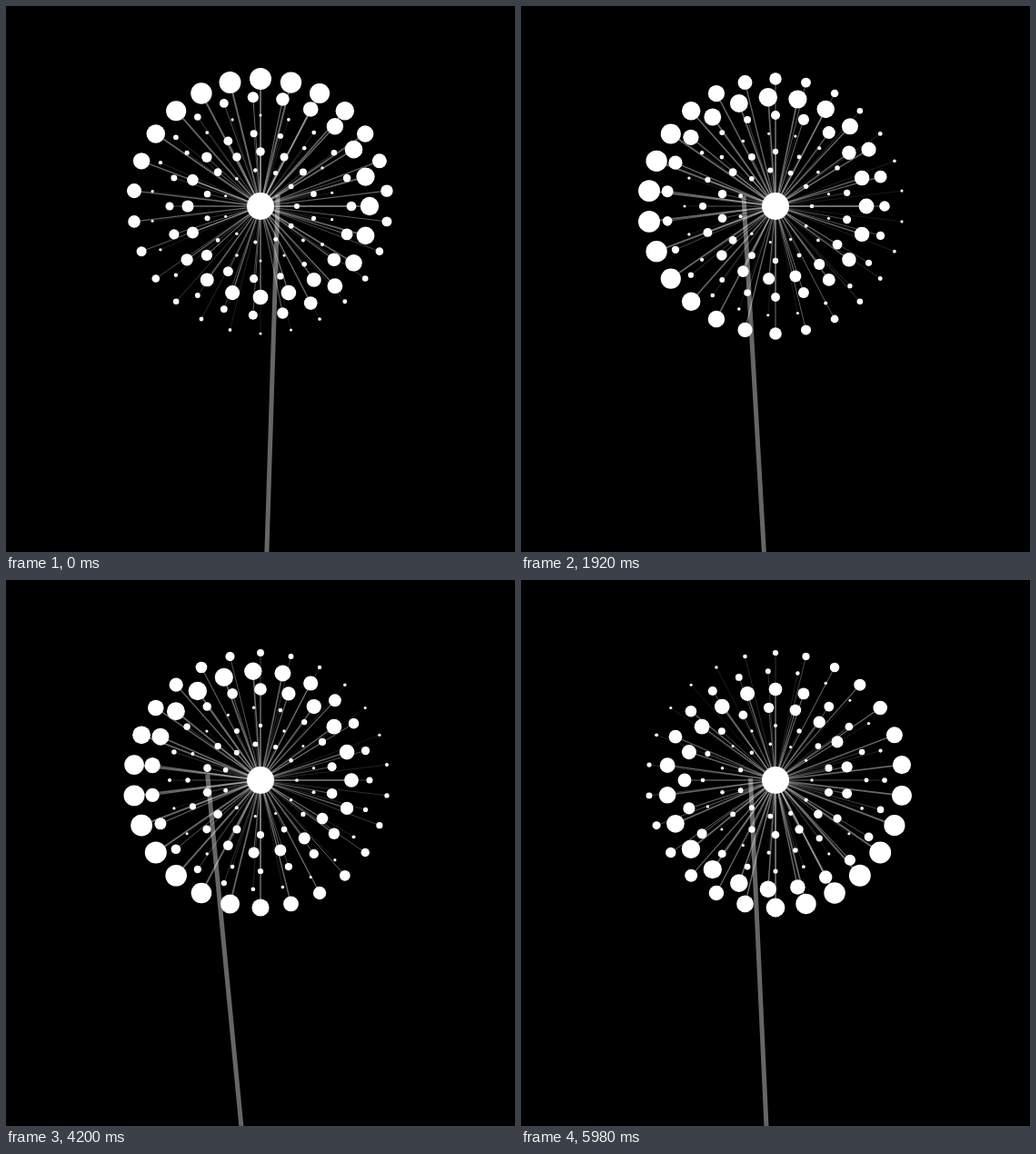
These frames come from a looping animation (560 px wide and 600 px high, 6000 ms). An HTML page with a canvas:

```html
<!DOCTYPE html>
<html lang="en">
<head>
<meta charset="utf-8">
<title>Dandelion</title>
<style>
  html, body { margin: 0; width: 100%; height: 100%; overflow: hidden; background: #000; }
  canvas { display: block; }
</style>
</head>
<body>
<canvas id="stage" width="560" height="600"></canvas>
<script>
const ctx = document.getElementById('stage').getContext('2d');
const TAU = Math.PI * 2;
const LOOP = 6000;
const PULSE = 2500;
const LEAD = 50;
const CX = 280, CY = 220;
const MIN_R = 1.5;
const FAINT = 'rgba(255,255,255,0.4)';

// Each ring has three more seeds and starts a quarter turn earlier.
const seeds = [];
for (let ring = 0; ring < 6; ring++) {
  const count = 11 + ring * 3;
  const dist = 40 + ring * 20;
  for (let i = 0; i < count; i++) {
    const turn = i / count;
    const angle = (turn - ring / 4) * TAU;
    seeds.push({
      turn,
      maxR: 3 + ring * 1.8,
      x: CX + dist * Math.cos(angle),
      y: CY + dist * Math.sin(angle)
    });
  }
}

function line(x1, y1, x2, y2, width) {
  ctx.lineWidth = width;
  ctx.beginPath();
  ctx.moveTo(x1, y1);
  ctx.lineTo(x2, y2);
  ctx.stroke();
}

function dot(x, y, r) {
  ctx.beginPath();
  ctx.arc(x, y, r, 0, TAU);
  ctx.fill();
}

function seedRadius(seed, t) {
  const wave = (1 + Math.cos(((t - LEAD) / PULSE - seed.turn) * TAU)) / 2;
  return MIN_R + (seed.maxR - MIN_R) * wave;
}

function draw(t) {
  ctx.fillStyle = '#000';
  ctx.fillRect(0, 0, 560, 600);
  ctx.fillStyle = '#fff';
  ctx.strokeStyle = FAINT;

  // The stem's tip travels along a flat ellipse.
  const sway = (t - 3800) / 2000;
  line(CX, 820, CX - 59.5 * Math.cos(sway), 213 + 5.5 * Math.sin(sway), 5);

  const radii = seeds.map(s => seedRadius(s, t));
  seeds.forEach((s, i) => line(CX, CY, s.x, s.y, radii[i] / 6));
  seeds.forEach((s, i) => dot(s.x, s.y, radii[i]));
  dot(CX, CY, 15);
}

const start = performance.now();
function tick() {
  draw((performance.now() - start) % LOOP);
  requestAnimationFrame(tick);
}
tick();
</script>
</body>
</html>
```
